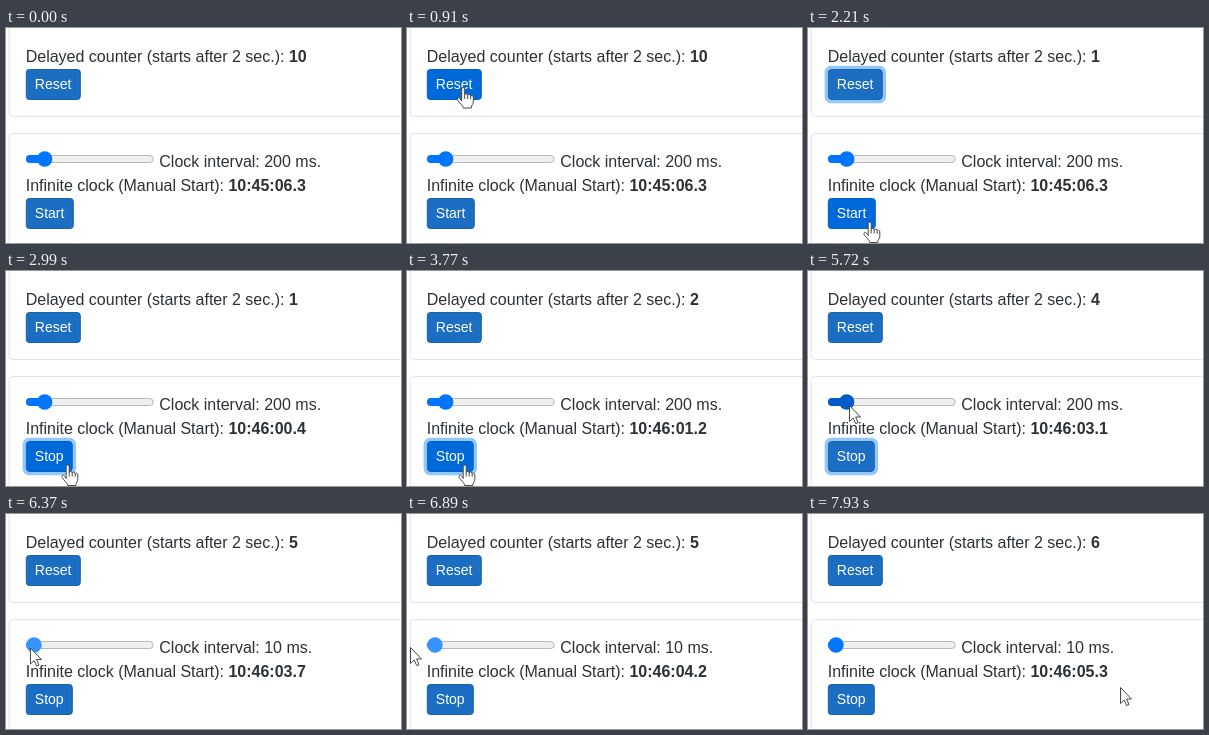
Recreate the animation shown at these times as an HTML page. Size 395 by 215 pixels, loop 8 s.

```html
<!DOCTYPE html>
<html lang="en">
<head>
<meta charset="utf-8">
<title>Timers</title>
<style>
html, body { margin: 0; width: 100%; height: 100%; overflow: hidden; background: #fff; }
svg { display: block; width: 100vw; height: 100vh; }
text { font: 16px "Liberation Sans", Arial, sans-serif; fill: #2c3136; white-space: pre; }
.bold { font-weight: 700; }
.btn text { font-size: 14px; fill: #fff; }
.card { fill: #fff; stroke: #e3e3e3; }
.ring { fill: none; stroke: #268fff; stroke-opacity: .5; stroke-width: 3.2; }
.cursor { fill: #fff; stroke: #484848; stroke-linejoin: round; }
</style>
</head>
<body>
<svg viewBox="0 0 395 215">
  <rect class="card" x="3.2" y="-20.5" width="420" height="109" rx="4"/>
  <rect class="card" x="3.2" y="105.5" width="420" height="140" rx="4"/>
  <text x="19.7" y="34">Delayed counter (starts after 2 sec.): <tspan class="bold" id="count"></tspan></text>
  <g class="btn" id="reset"></g>
  <rect x="20.2" y="127.5" width="127" height="7" rx="3.5" fill="#efefef" stroke="#b9b9b9"/>
  <rect id="fill" x="20" y="127" height="8" rx="4"/>
  <circle id="thumb" cy="131" r="7.7"/>
  <text x="153.3" y="139">Clock interval: <tspan id="interval"></tspan> ms.</text>
  <text x="19.7" y="163">Infinite clock (Manual Start): <tspan class="bold" id="clock"></tspan></text>
  <g class="btn" id="toggle"></g>
  <path class="cursor" id="arrow" d="M.5 .5V16.5L4.2 13 6.7 18.6 9 17.6 6.6 12H11.5Z"/>
  <g class="cursor" id="hand">
    <path d="M-1.5 14V2a1.5 1.5 0 0 1 3 0V8c0-1.6 3-1.6 3 .5c0-1.5 3-1.3 3 .8c.3-1.2 2.6-1 2.6 1V15c0 2-2 3-2 6H0c0-2.5-4-5-5.5-8c-1-2 1-3 2.3-1.5z"/>
    <path d="M1.5 8v4M4.5 8.5v3.5M7.5 9.3v3" fill="none"/>
  </g>
</svg>
<script>
const LOOP = 8000, STEP = 130;
const RESET_AT = 1170, START_AT = 2860, TICK_AT = 2985, TICK = 195;
const PRESS_AT = 5980, FAST_AT = 6240, RELEASE_AT = 6950;
const MAX_X = 38.7, MIN_X = 28;
const $ = id => document.getElementById(id);

// time, x, y of the pointer tip
const path = [
  [390, 110, 92], [780, 56.2, 59], [1600, 56.2, 59], [2200, 61.7, 193.5],
  [3400, 61.7, 193.5], [3740, 57.7, 193.5], [3950, 57.7, 193.5], [4750, 78, 164],
  [5650, 41, 134], [6030, 41, 134], [6760, 3, 133], [6890, 3, 133],
  [7050, 0, 135], [7760, 312, 173]
];

function pointer(t) {
  if (t < path[0][0]) return null;
  const i = path.findIndex(p => p[0] > t);
  if (i < 0) return path[path.length - 1].slice(1);
  const a = path[i - 1], b = path[i];
  const u = (t - a[0]) / (b[0] - a[0]), e = u * u * (3 - 2 * u);
  return [a[1] + (b[1] - a[1]) * e, a[2] + (b[2] - a[2]) * e];
}

function makeButton(id, y) {
  $(id).innerHTML =
    `<rect class="ring" x="18.2" y="${y - 1.6}" height="34.2" rx="4.8"/>` +
    `<rect class="face" x="20.3" y="${y + .5}" height="30" rx="3"/>` +
    `<text x="28.8" y="${y + 20}"></text>`;
  const [ring, face, label] = $(id).children;
  return (text, width, focus, hover) => {
    ring.setAttribute("width", width + 3.2);
    ring.style.display = focus ? "" : "none";
    face.setAttribute("width", width - 1);
    face.setAttribute("fill", hover ? "#0069d9" : "#1b6ec2");
    face.setAttribute("stroke", hover ? "#0062cc" : "#1861ac");
    label.textContent = text;
  };
}
const drawReset = makeButton("reset", 41);
const drawToggle = makeButton("toggle", 170);

function counter(t) {
  if (t < RESET_AT) return 10;
  return t < 2200 ? 0 : 1 + Math.floor((t - 2200) / 1000);
}

function clock(t) {
  if (t < TICK_AT) return "10:45:06.3";
  const s = t < FAST_AT
    ? 60.46 + Math.floor((t - TICK_AT) / TICK) * TICK / 1000
    : 57.39 + t / 1000;
  return "10:46:0" + (Math.floor((s - 60) * 10) / 10).toFixed(1);
}

function place(id, pos, shown) {
  $(id).style.display = shown ? "" : "none";
  if (shown) $(id).setAttribute("transform", `translate(${pos[0]} ${pos[1]})`);
}

function drawSlider(x, color) {
  $("fill").setAttribute("width", x - 20);
  $("fill").setAttribute("fill", color);
  $("thumb").setAttribute("cx", x);
  $("thumb").setAttribute("fill", color);
  $("interval").textContent = 10 + Math.round((x - MIN_X) / (MAX_X - MIN_X) * 19) * 10;
}

function draw(t) {
  const pos = pointer(t);
  const drag = t >= PRESS_AT && t < RELEASE_AT;
  const over = (x, y, w, h) => !!pos && !drag &&
    pos[0] >= x && pos[0] <= x + w && pos[1] >= y && pos[1] <= y + h;
  const running = t >= START_AT;
  const width = running ? 47 : 48;
  const onReset = over(20, 41, 55, 31), onToggle = over(20, 170, width, 31);

  $("count").textContent = counter(t);
  $("clock").textContent = clock(t);
  drawReset("Reset", 55, t >= RESET_AT && !running, onReset);
  drawToggle(running ? "Stop" : "Start", width, running && t < PRESS_AT, onToggle);

  const x = t < PRESS_AT ? MAX_X
    : t < RELEASE_AT ? Math.max(MIN_X, Math.min(MAX_X, pos[0] - 2)) : MIN_X;
  drawSlider(x, drag ? "#3793ff" : over(20, 123, 128, 16) ? "#005cc8" : "#0075ff");

  const hand = onReset || onToggle;
  place("hand", pos, hand);
  place("arrow", pos, pos && !hand);
}

function frame(now) {
  draw(Math.floor(now % LOOP / STEP) * STEP);
  requestAnimationFrame(frame);
}
draw(0);
requestAnimationFrame(frame);
</script>
</body>
</html>
```
